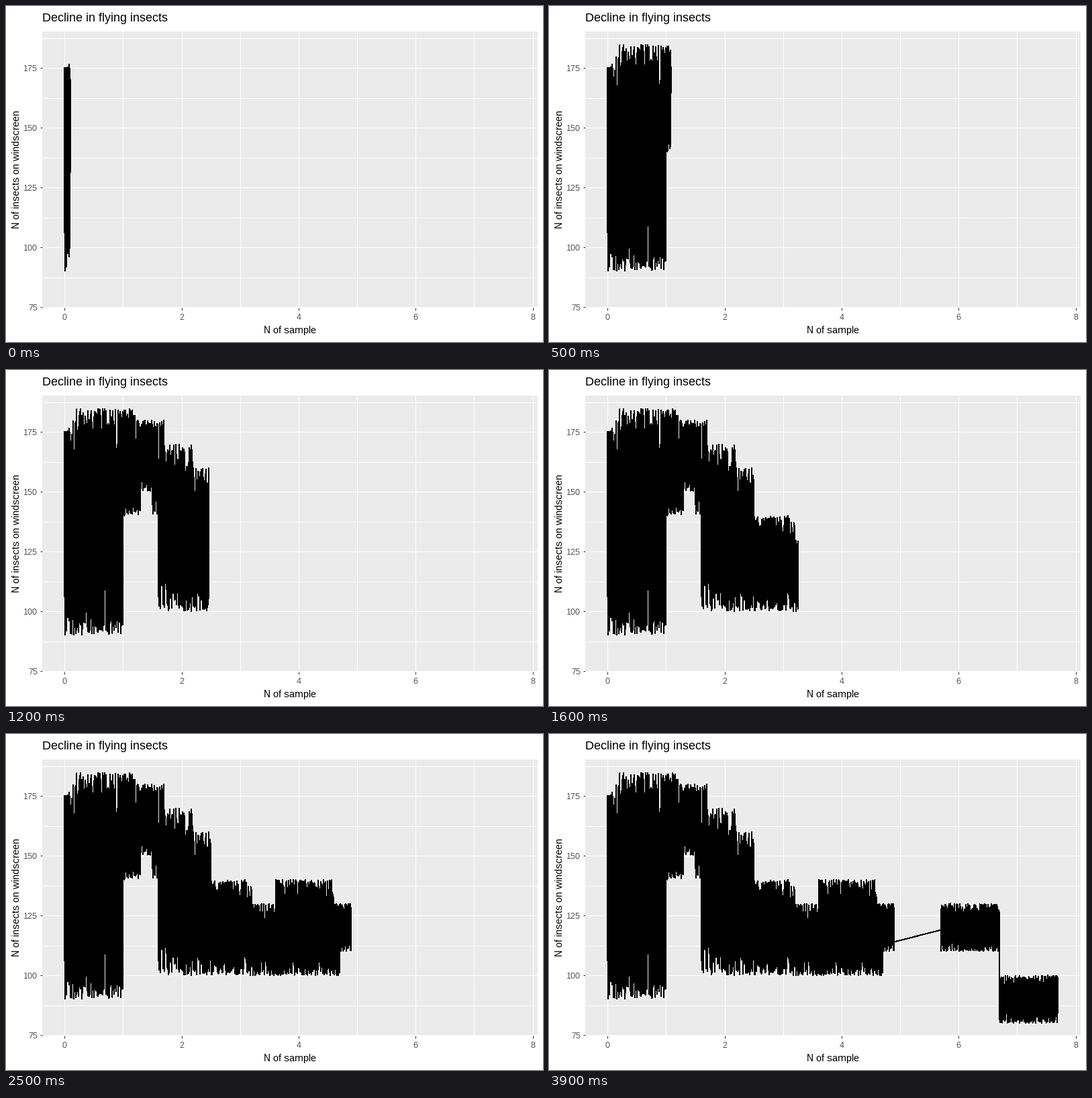
Recreate the animation shown at these times as a matplotlib script. Size 800 by 500 pixels, loop 10000 ms.

```python
import numpy as np
import matplotlib.pyplot as plt
from matplotlib.animation import FuncAnimation
from matplotlib.collections import LineCollection

W, H, DPI = 800, 500, 100
PX = 72 / DPI  # points per pixel
LEFT, RIGHT, TOP, BOTTOM = 53.6, 792, 38, 449
X0, X1, Y0, Y1 = -0.385, 8.085, 74.75, 190.25
X_END, GAP = 7.7, (4.9, 5.7)
REVEAL_FRAMES, FRAMES, INTERVAL = 40, 100, 100
CHUNK = 100

# Fully hinted glyphs on whole-pixel advances
plt.rcParams.update({"font.family": "Liberation Sans",
                     "text.hinting": "native", "text.hinting_factor": 1})


def steps(x, edges, levels):
    """Piecewise constant curve that jumps to the next level at each edge."""
    return np.take(levels, np.searchsorted(edges, x, side="right"))


def make_samples(step=0.001):
    x = np.arange(round(X_END / step) + 1) * step
    x = x[(x <= GAP[0]) | (x >= GAP[1])]
    high = steps(x, [0.2, 1.2, 1.7, 2.2, 2.5, 3.2, 3.6, 4.6, 6.7],
                 [180, 185, 180, 170, 160, 140, 130, 140, 130, 100])
    low = steps(x, [1, 1.3, 1.5, 1.6, 4.7, 6.7],
                [90, 140, 150, 140, 100, 110, 80])
    y = np.random.default_rng(12).uniform(low, high)
    after_gap = np.searchsorted(x, np.mean(GAP))
    y[after_gap - 1:after_gap + 1] = 114, 119
    return np.column_stack([x, y])


def to_px(x, y):
    return (LEFT + (x - X0) / (X1 - X0) * (RIGHT - LEFT),
            BOTTOM - (y - Y0) / (Y1 - Y0) * (BOTTOM - TOP))


def label(px, py, text, size, **style):
    fig.text(px / W, 1 - py / H, text, fontsize=size * PX, va="baseline", **style)


fig = plt.figure(figsize=(W / DPI, H / DPI), dpi=DPI, facecolor="white")
ax = fig.add_axes([LEFT / W, 1 - BOTTOM / H, (RIGHT - LEFT) / W, (BOTTOM - TOP) / H],
                  facecolor="#EBEBEB", xlim=(X0, X1), ylim=(Y0, Y1))
for spine in ax.spines.values():
    spine.set_visible(False)

xticks, yticks = range(0, 9, 2), range(75, 176, 25)
ax.set_xticks(xticks, [""] * len(xticks))
ax.set_yticks(yticks, [""] * len(yticks))
ax.tick_params(length=3.5 * PX, width=PX, color="#333333")

grid = dict(color="white", lw=PX, antialiased=False, zorder=1)
for gx in range(9):
    ax.axvline(gx, **grid)
for gy in np.arange(75, 190, 12.5):
    ax.axhline(gy, **grid)

for tick in xticks:
    label(to_px(tick, 0)[0], 467, str(tick), 12, color="#4D4D4D", ha="center")
for tick in yticks:
    label(47.3, to_px(0, tick)[1] + 5, str(tick), 12, color="#4D4D4D", ha="right")
label(54, 23, "Decline in flying insects", 18)
label(423, 487, "N of sample", 15, ha="center")
label(20, 243, "N of insects on windscreen", 15, ha="center",
      rotation=90, rotation_mode="anchor")

# Without antialiasing every touched pixel is filled, so 1 px draws as 2
samples = make_samples()
trace = LineCollection([], colors="black", linewidths=PX, antialiaseds=False,
                       capstyle="butt", joinstyle="round", zorder=2)
ax.add_collection(trace, autolim=False)


def update(frame):
    reach = 0.1 + X_END * frame / (REVEAL_FRAMES - 1)
    shown = samples[samples[:, 0] <= reach]
    trace.set_segments([shown[i:i + CHUNK + 1]
                        for i in range(0, len(shown) - 1, CHUNK)])
    return trace,


anim = FuncAnimation(fig, update, frames=FRAMES, interval=INTERVAL,
                     repeat=True, repeat_delay=0)
plt.show()
```
